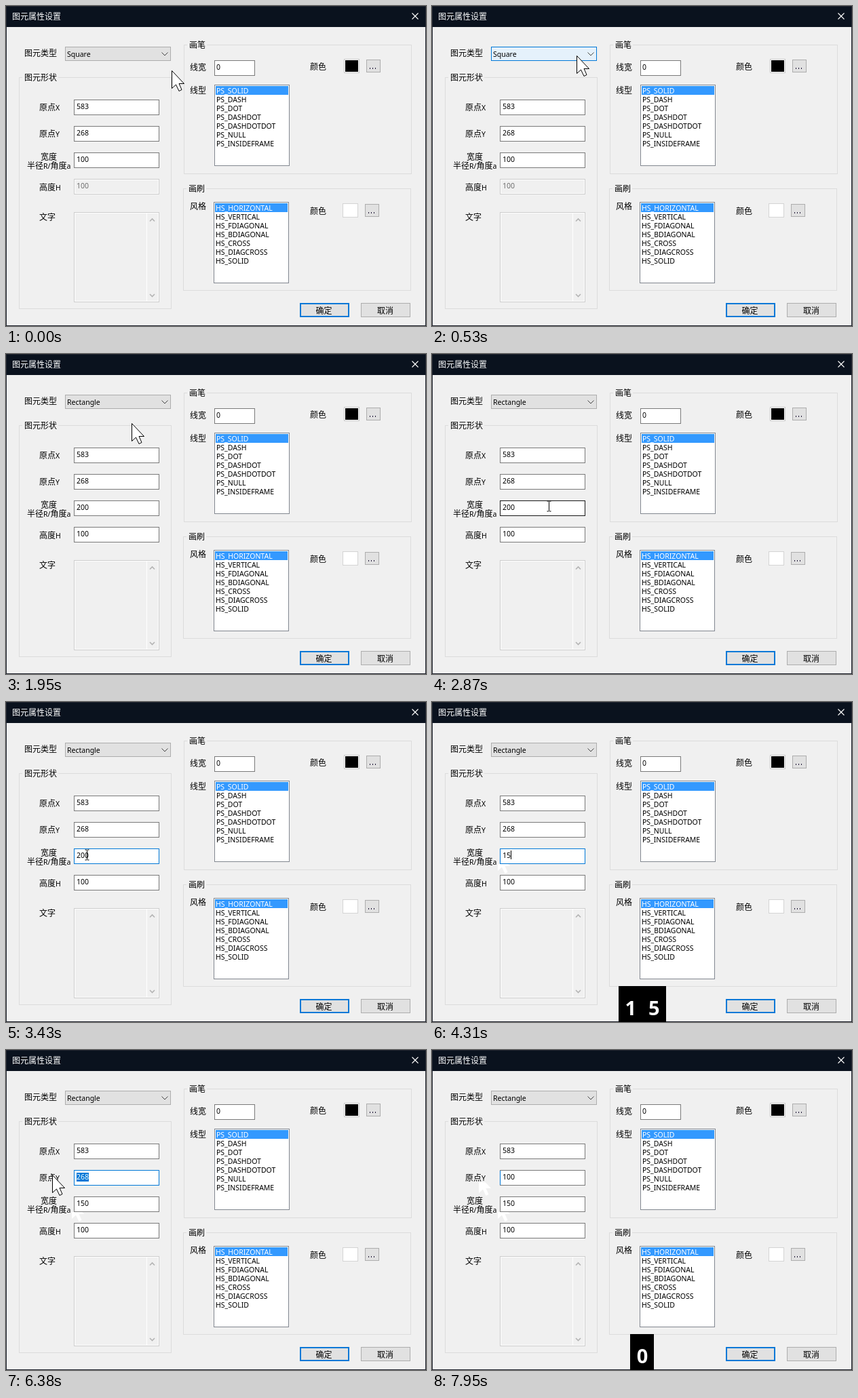
Animation, 619 px wide and 472 px high, one loop 8000 ms. Source, as an HTML page:

```html
<!DOCTYPE html>
<html lang="zh-CN">
<head>
<meta charset="utf-8">
<title>图元属性设置</title>
<style>
html, body { margin: 0; width: 100%; height: 100%; overflow: hidden; background: #f0f0f0; }
svg { display: block; font: 10.5px "Noto Sans", "Noto Sans CJK SC", sans-serif; }
text { white-space: pre; }
.label { font-size: 12px; }
.latin { font-size: 10.5px; }
.key { font: bold 29px "Open Sans", "Noto Sans", sans-serif; text-anchor: middle; }
.mid { text-anchor: middle; }
</style>
</head>
<body>
<svg id="stage" width="619" height="472" viewBox="0 0 619 472"></svg>
<script>
const LOOP = 8000, STEP = 78;
const BLUE = '#0078d7', GREY = '#7a7a7a', PALE = '#cccccc', PICK = '#3399ff', FACE = '#f0f0f0';
const ARROW = 'M0 0V26L6 20.5L10.5 30L14.5 28L10.5 19H18Z';
const IBEAM = 'M-3 -7.5H-.5M.5 -7.5H3M0 -7V7M-3 7.5H-.5M.5 7.5H3';
const stage = document.getElementById('stage');

// time, x, y of the pointer; it advances in small steps between the keys
const PATH = [
  [0, 245, 96], [70, 241, 91], [380, 214, 74], [910, 213, 74], [990, 207, 81],
  [1310, 190, 98], [1540, 187, 98], [1870, 187, 98], [2640, 178, 146],
  [2720, 177, 160], [2870, 172, 224], [2950, 172, 224], [3030, 165, 226],
  [3280, 126, 226], [3600, 97, 223], [4240, 97, 223],
  [5440, 104, 224], [5600, 106, 220], [5900, 126, 188], [6070, 126, 188],
  [6380, 69, 185], [8000, 69, 185]
];
const KINDS = ['Square', 'Rectangle', 'Circle', 'Ellipse', 'Triangle', 'Text'];
const PENS = ['SOLID', 'DASH', 'DOT', 'DASHDOT', 'DASHDOTDOT', 'NULL', 'INSIDEFRAME'].map(s => 'PS_' + s);
const HATCHES = ['HORIZONTAL', 'VERTICAL', 'FDIAGONAL', 'BDIAGONAL', 'CROSS', 'DIAGCROSS', 'SOLID'].map(s => 'HS_' + s);

const fill = (x, y, x2, y2, c) =>
  `<rect x="${x}" y="${y}" width="${x2 - x}" height="${y2 - y}" fill="${c}"/>`;
const box = (x, y, x2, y2, c, line) =>
  `<rect x="${x + .5}" y="${y + .5}" width="${x2 - x - 1}" height="${y2 - y - 1}" fill="${c}" stroke="${line}"/>`;
const disabledBox = (x, y, x2, y2) =>
  box(x, y, x2, y2, FACE, PALE) + box(x + 1, y + 1, x2 - 1, y2 - 1, 'none', '#fff');
const text = (x, y, s, c = '#000', cls = '') => `<text x="${x}" y="${y}" fill="${c}" class="${cls}">${s}</text>`;
const label = (x, y, s, c, cls = 'label') =>
  text(x, y, s.replace(/[A-Za-z\/]+/g, '<tspan class="latin">$&</tspan>'), c, cls);
const line = (d, c, w = 1) => `<path d="${d}" fill="none" stroke="${c}" stroke-width="${w}"/>`;

// value in force at time t from a list of [start, value]
const at = (list, t) => list.reduce((v, [start, next]) => t >= start ? next : v, '');

function pointer(t) {
  const i = PATH.findIndex((k, n) => n && t < k[0]);
  const [t0, x0, y0] = PATH[i - 1], [t1, x1, y1] = PATH[i];
  const u = Math.floor((t - t0) / STEP) * STEP / (t1 - t0);
  return { x: Math.round(x0 + (x1 - x0) * u), y: Math.round(y0 + (y1 - y0) * u) };
}

function group(x, y, x2, y2, name) {
  return box(x, y, x2, y2, 'none', '#dcdcdc') +
    fill(x + 5, y - 1, x + 10 + name.length * 12, y + 2, FACE) + label(x + 8, y + 4.5, name);
}

function items(x, y, w, names, picked) {
  return names.map((s, i) => {
    const top = y + i * 13, on = i === picked;
    return (on ? fill(x, top, x + w, top + 13, PICK) : '') + text(x + 1, top + 10.5, s, on ? '#fff' : '#000');
  }).join('');
}

const list = (x, y, names) => box(x, y, x + 111, y + 120, '#fff', '#828790') + items(x + 2, y + 2, 107, names, 0);

function colorPick(x, y, c, edge) {
  return label(448, y + 15.5, '颜色') + box(x, y, x + 23, y + 21, '#fff', edge) +
    fill(x + 2, y + 2, x + 21, y + 19, c) + box(x + 33, y + 1, x + 54, y + 20, '#e1e1e1', '#adadad') +
    [38, 42, 46].map(dx => fill(x + dx, y + 13, x + dx + 1, y + 15, '#201838')).join('');
}

function field(y, value, edge, off, from = 3) {
  const chosen = value.slice(from);
  return (off ? disabledBox(100, y, 226, y + 23) : box(100, y, 226, y + 23, '#fff', edge)) +
    (chosen ? fill(104 + from * 6, y + 4, 122, y + 17, BLUE) : '') +
    text(104, y + 14, value.slice(0, from) + `<tspan fill="#fff">${chosen}</tspan>`, off ? '#6d6d6d' : '#000');
}

function fields(t, mouse, hover) {
  const focus = t >= 6070 ? 1 : t >= 3280 ? 2 : -1;
  const values = [
    '583',
    at([[0, '268'], [6910, '1'], [7240, '10'], [7390, '100']], t),
    at([[0, '100'], [1870, '200'], [4240, '1'], [4310, '15'], [4610, '150']], t),
    '100'
  ];
  const dragging = t >= 3280 && t < 4240 || t >= 6070 && t < 6910;
  const first = Math.max(0, Math.min(3, Math.round((mouse.x - 104) / 6)));
  let out = values.map((v, i) => {
    const off = i === 3 && t < 1870;
    const edge = i === focus && t < 6910 ? BLUE : i === hover ? '#171717' : GREY;
    return field(138 + i * 39, v, edge, off, dragging && i === focus ? first : 3);
  }).join('');
  if (t >= 6910) out += fill(100, 178, 101, 199, BLUE);
  if (t >= 3600 && t < 4010) out += fill(104, 219, 105, 231, '#ff8728');
  if (t >= 4240 && t < 5190 || t >= 6910 && t < 7950) {
    const x = 104 + values[focus].length * 6, y = 141 + focus * 39;
    out += fill(x, y, x + 1, y + 13, '#000');
  }
  return out;
}

function combo(t, mouse, open) {
  const hot = mouse.x >= 87 && mouse.x < 243 && mouse.y >= 60 && mouse.y < 82;
  const [c, edge] = open ? ['#cce4f7', '#005499'] : hot ? ['#e5f1fb', BLUE] : ['#e1e1e1', '#adadad'];
  return box(87, 60, 243, 81, c, edge) + text(90, 75, t < 1870 ? 'Square' : 'Rectangle') +
    line('M229.5 68.5L234 73L238.5 68.5', '#444');
}

function dropdown(t) {
  return fill(90, 85, 246, 164, 'rgba(0,0,0,.16)') + fill(90, 85, 245, 163, 'rgba(0,0,0,.2)') +
    box(87, 81, 243, 162, '#fff', BLUE) + items(88, 83, 154, KINDS, t < 1310 ? 0 : 1);
}

function keys(t) {
  const s = at([[4240, '1'], [4310, '15'], [4610, '150'], [5110, '50'], [5270, '0'], [5600, ''],
    [7010, '1'], [7240, '10'], [7870, '0']], t);
  if (!s) return '';
  const half = s.length * 17.25 + .5;
  return fill(Math.round(309.7 - half), 419, Math.round(309.7 + half), 472, '#000') +
    [...s].map((c, i) => text(310 + (i - (s.length - 1) / 2) * 34.5, 462, c, '#fff', 'key')).join('');
}

// white trail left where the pointer last stood
const trail = (x, y, cut) => `<svg x="0" y="${cut}" width="619" height="60">
  <path d="${ARROW}" transform="translate(${x} ${y - cut})" fill="#fff"/></svg>`;

function scene(t) {
  const mouse = pointer(t);
  const open = t >= 610 && t < 1870;
  const shown = t < 4240 || t >= 5440 && t < 6910;
  const row = Math.floor((mouse.y - 138) / 39);
  const inside = shown && !open && mouse.x >= 100 && mouse.x < 226 && row >= 0 && (mouse.y - 138) % 39 < 23;
  let out = fill(0, 0, 619, 472, FACE) +
    group(19, 105, 244, 447, '图元形状') + group(262, 57, 598, 248, '画笔') + group(261, 269, 597, 420, '画刷');
  if (t >= 4240) out += trail(97, 223, 239);
  if (t >= 6910) out += trail(69, 185, 195);
  out += label(27, 73.5, '图元类型') + label(49, 153.5, '原点X') + label(49, 193, '原点Y') +
    label(51, 226.5, '宽度') + label(31, 239.5, '半径R/角度a') + label(49, 271.5, '高度H') + label(49, 315.5, '文字') +
    label(271, 94.5, '线宽') + label(271, 128.5, '线型') + label(271, 299.5, '风格') +
    box(307, 80, 367, 103, '#fff', GREY) + text(310, 94, '0') +
    list(307, 116, PENS) + list(306, 289, HATCHES) +
    colorPick(498, 78, '#000', '#c8c8c8') + colorPick(496, 291, '#fff', '#d4d4d4') +
    disabledBox(100, 304, 226, 437) + fill(207, 306, 208, 435, '#fff') +
    line('M212 317.5L215.5 314L219 317.5M212 425L215.5 428.5L219 425', '#b4b4b4', 1.6) +
    fill(433, 438, 506, 459, BLUE) + fill(435, 440, 504, 457, '#e1e1e1') +
    box(523, 438, 596, 459, '#e1e1e1', '#adadad') +
    label(468.5, 453.5, '确定', '#000', 'label mid') + label(559, 453.5, '取消', '#000', 'label mid') +
    fields(t, mouse, inside ? row : -1) + combo(t, mouse, open) + (open ? dropdown(t) : '') +
    fill(0, 0, 619, 31, '#0a121e') + box(0, 0, 619, 472, 'none', '#20242e') +
    label(9, 20, '图元属性设置', '#fff') + line('M598.5 10.5L607.5 19.5M607.5 10.5L598.5 19.5', '#fff', 1.1) + keys(t);
  if (shown) {
    const look = inside ? `d="${IBEAM}" fill="none"` : `d="${ARROW}" fill="#fff"`;
    const nudge = inside ? .5 : -.5;
    out += `<path ${look} stroke="#000" transform="translate(${mouse.x + nudge} ${mouse.y + nudge})"/>`;
  }
  return out;
}

let drawn = '';
function tick(now) {
  const next = scene(now % LOOP);
  if (next !== drawn) stage.innerHTML = drawn = next;
  requestAnimationFrame(tick);
}
tick(0);
</script>
</body>
</html>
```
